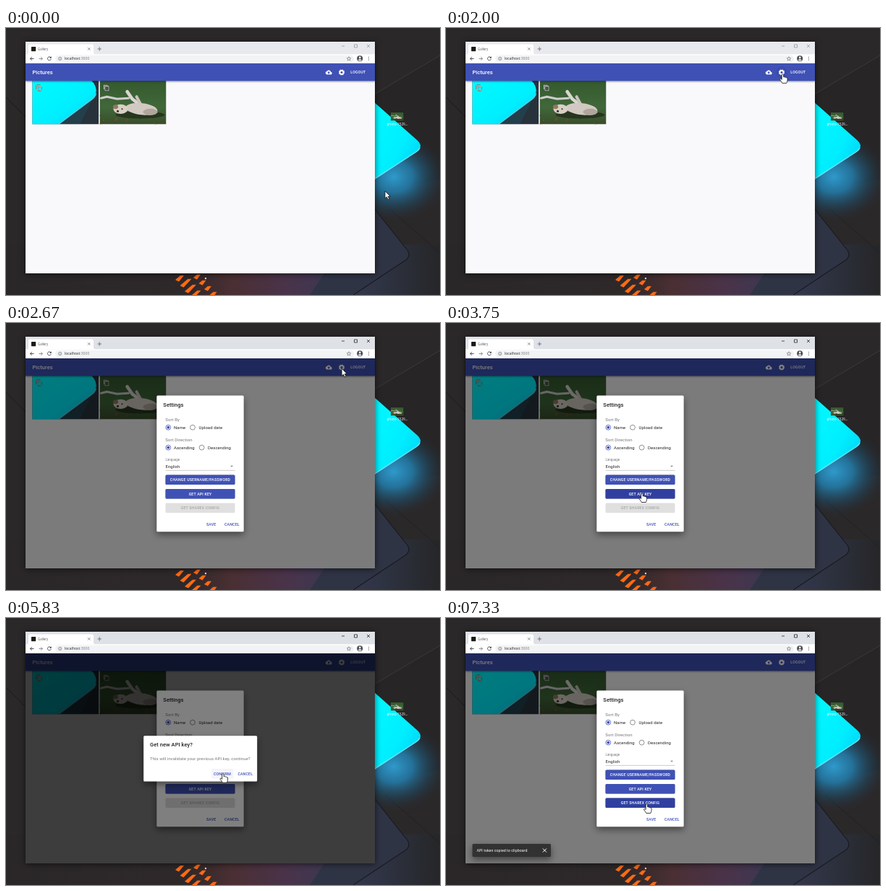
These frames come from a looping animation (600x370 px, 8000 ms). An HTML page:

```html
<!DOCTYPE html>
<html lang="en">
<head>
<meta charset="utf-8">
<title>Gallery settings</title>
<style>
html, body { margin: 0; width: 100%; height: 100%; overflow: hidden; background: #2b2829; }
svg { display: block; }
text { font-family: Roboto, sans-serif; white-space: pre; }
.os { font-family: "Open Sans", sans-serif; }
.card { filter: drop-shadow(0 4px 5px rgba(0,0,0,.45)); }
.raised { filter: drop-shadow(0 .8px .7px rgba(0,0,0,.4)); }
.icon { filter: drop-shadow(0 0 1px #000) drop-shadow(0 0 1px rgba(0,0,0,.6)); }
</style>
</head>
<body>
<svg id="stage" width="600" height="370" viewBox="0 0 600 370"></svg>
<script>
const LOOP = 8000, FPS = 12;
const INDIGO = '#3f51b5', DARK = '#303f9f', INK = 'rgba(0,0,0,.87)', SOFT = 'rgba(0,0,0,.54)';
const stage = document.getElementById('stage');
const $ = id => document.getElementById(id);

// Markup helpers
const text = (x, y, size, str, fill = INK, more = '') =>
  `<text x="${x}" y="${y}" font-size="${size}" fill="${fill}" ${more}>${str}</text>`;
const rect = (x, y, w, h, fill, more = '') =>
  `<rect x="${x}" y="${y}" width="${w}" height="${h}" fill="${fill}" ${more}/>`;
const circle = (x, y, r, fill, more = '') =>
  `<circle cx="${x}" cy="${y}" r="${r}" fill="${fill}" ${more}/>`;
const path = (d, fill, more = '') => `<path d="${d}" fill="${fill}" ${more}/>`;
const line = (d, color, width = 1, more = '') =>
  path(d, 'none', `stroke="${color}" stroke-width="${width}" ${more}`);
const at = (x, y, scale, body, more = '') =>
  `<g transform="translate(${x} ${y}) scale(${scale})" ${more}>${body}</g>`;
const caps = (x, y, str, fill, more = '') =>
  text(x, y, 5.25, str, fill, `font-weight="500" letter-spacing=".15" ${more}`);
const title = (x, y, str, fill) => text(x, y, 7.5, str, fill, 'font-weight="500" letter-spacing=".056"');
const body = (x, y, str, fill) => text(x, y, 6, str, fill, 'letter-spacing=".056"');

const radio = (x, y, on) => on
  ? circle(x, y, 3.4, 'none', `stroke="${INDIGO}" stroke-width=".8"`) + circle(x, y, 1.9, INDIGO)
  : circle(x, y, 3.4, 'none', `stroke="${SOFT}" stroke-width=".8"`);

const button = (i, str) => {
  const y = 210.5 + i * 19.5;
  return rect(220.5, y, 96, 13.5, INDIGO, `id="btn${i}" rx="1.5" class="raised"`) +
    caps(268.5, y + 8.6, str, '#fff', `id="label${i}" text-anchor="middle"`);
};

const COPY = 'M16 1H4c-1.1 0-2 .9-2 2v14h2V3h12V1zm3 4H8c-1.1 0-2 .9-2 2v14c0 1.1.9 2 2 2h11c1.1 0 2-.9 2-2V7c0-1.1-.9-2-2-2zm0 16H8V7h11v14z';
const CLOUD = 'M19.35 10.04C18.67 6.59 15.64 4 12 4 9.11 4 6.6 5.64 5.35 8.04 2.34 8.36 0 10.91 0 14c0 3.31 2.69 6 6 6h13c2.76 0 5-2.24 5-5 0-2.64-2.05-4.78-4.65-4.96zM14 13v4h-4v-4H7l5-5 5 5h-3z';

function defs() {
  const stops = list => list.map(([o, c, a = 1]) =>
    `<stop offset="${o}" stop-color="${c}" stop-opacity="${a}"/>`).join('');
  let leaves = '';
  for (let i = 0; i < 26; i++)
    leaves += circle((i * 37) % 92, 48 + (i * 7) % 12, .7 + (i % 3) * .3, i % 2 ? '#7d4a36' : '#2c4a20');
  return `<defs>
    <linearGradient id="floor">${stops([[0, '#2a2728'], [.42, '#2e2829'], [.52, '#4a2f33'], [.64, '#4a3349'], [.76, '#3a3853'], [.87, '#2e3342'], [1, '#262628']])}</linearGradient>
    <radialGradient id="glow">${stops([[0, '#2fa0d4', .95], [.35, '#247fae', .85], [.7, '#1e4f6c', .45], [1, '#22303c', 0]])}</radialGradient>
    <linearGradient id="cyan" x2="1" y2="1">${stops([[0, '#00fbff'], [.6, '#00eeff'], [1, '#00c8f2']])}</linearGradient>
    <linearGradient id="grass" x2="0" y2="1">${stops([[0, '#34592d'], [.6, '#40683a'], [1, '#3a4d2b']])}</linearGradient>
    <clipPath id="key">${rect(220.5, 230, 96, 13.5, '#000', 'rx="1.5"')}</clipPath>
    <symbol id="dog" viewBox="0 0 92 60">
      ${rect(0, 0, 92, 60, 'url(#grass)')}${leaves}
      <ellipse cx="56" cy="47" rx="34" ry="5" fill="#26361f"/>
      <g stroke-linecap="round" stroke-linejoin="round">
        ${line('M2 24L10 22L24 25L40 24', '#cfcdcd', 3)}
        ${line('M38 15L45 25L54 32', '#d9d5d2', 4.5)}
        ${line('M51 22L57 33', '#c9c3bd', 4)}
      </g>
      <ellipse cx="58" cy="39" rx="22" ry="8" fill="#d2cac2" transform="rotate(6 58 39)"/>
      <ellipse cx="70" cy="43" rx="10" ry="4.500" fill="#b0a69d"/>
      <ellipse cx="29" cy="39" rx="10" ry="6.500" fill="#d8cfc5"/>
      <ellipse cx="22" cy="36" rx="3.500" ry="3" fill="#94785f"/>
      ${circle(25, 42, 1.5, '#30251f')}${circle(31, 39, 1, '#30251f')}
    </symbol>
  </defs>`;
}

function desktop() {
  const bar = (x, y, len) =>
    path(`M${x} ${y}l${len} ${-len * .85}h5l${-len} ${len * .85 + 2.5}z`, '#ff6a13');
  let bars = '';
  for (let i = 0; i < 4; i++)
    bars += bar(234 + i * 6.5, 349 + i * 8, 7 + Math.min(i, 1) * 4) + bar(259 + i * 7.5, 346 + i * 8, 5);
  return rect(0, 0, 600, 370, '#2b2829') +
    path('M509 92L600 38V210L509 230z', '#272526') +
    line('M600 38L509 92', '#3b393a') + line('M0 96L28 124M0 353L28 331', '#1c1a1b') +
    rect(0, 300, 600, 70, 'url(#floor)') +
    path('M509 250L555 308Q560 316 552 322L480 370H420L500 250z', '#2f3444') +
    line('M509 250L555 308Q560 316 552 322L480 370', '#191b22', 1.2) +
    line('M524 245L600 312', '#1f2126') +
    `<ellipse cx="536" cy="206" rx="74" ry="62" fill="url(#glow)"/>` +
    path('M500 95L569 156Q577 164 569 170L500 216z', 'url(#cyan)') +
    line('M572 166Q571 169 568 171L505 212', '#6fe3f3', 1.5) +
    bars + circle(276, 347, 1.2, '#e8dcd6') +
    '<use href="#dog" x="532" y="117" width="17.5" height="11.5"/>' +
    text(541, 135.3, 4.7, 'photo-1529...', '#fff', 'class="os" text-anchor="middle"');
}

function browser() {
  const g = '#5f6368';
  return rect(27, 19, 483, 321, '#f9f8fa', 'style="filter:drop-shadow(0 1px 4px rgba(0,0,0,.6))"') +
    rect(27, 19, 483, 17.5, '#e7e9ed', 'id="strip"') +
    path('M28 36.5Q31 36.5 31 33.5V25Q31 22.5 33.5 22.5H118.5Q121 22.5 121 25V33.5Q121 36.5 124 36.5z', '#fff') +
    rect(35, 26, 6.2, 6.2, '#1d1b12', 'rx=".6"') +
    text(44, 31, 4.4, 'Gallery', '#55585c', 'class="os"') +
    line('M113 27.2l3.5 3.5m0 -3.5l-3.5 3.5', g, .7) +
    line('M126.5 29h5.5M129.25 26.25v5.5', g, .8) +
    line('M464 25h4M481.500 23h4v4h-4zM499 23l4 4m0 -4l-4 4', '#8d9093', .7, 'id="controls"') +
    rect(27, 36.5, 483, 12.5, '#fff') +
    rect(68, 37.7, 413, 9.6, '#f1f3f4', 'rx="4.8"') +
    line('M38.5 42.5h-5m2.3 -2.3l-2.3 2.3l2.3 2.3', '#3f4246', .9) +
    line('M45.5 42.5h5m-2.3 -2.3l2.3 2.3l-2.3 2.3', '#85888c', .9) +
    line('M62 40.9a2.5 2.5 0 1 0 .3 2.3', '#3f4246', .9) + path('M62.7 39.3v2.6h-2.6z', '#3f4246') +
    circle(74.7, 42.5, 2.2, 'none', `stroke="${g}" stroke-width=".6"`) + line('M74.7 42.2v1.5M74.7 41v.6', g, .6) +
    text(81, 44.2, 5.1, 'localhost<tspan fill="#777b80">:3000</tspan>', '#202124', 'class="os"') +
    line('M474 39.7l.8 1.8l2 .2l-1.5 1.3l.5 2l-1.8 -1.1l-1.8 1.1l.5 -2l-1.5 -1.3l2 -.2z', g, .6) +
    circle(489.2, 42.3, 4, '#4a4d51') + circle(489.2, 41, 1.4, '#fff') + path('M486.6 44.5q2.6 -2.6 5.2 0q-2.6 2 -5.2 0z', '#fff') +
    [40.3, 42.3, 44.3].map(y => circle(501.5, y, .6, g)).join('');
}

function page() {
  const gear = circle(0, 0, 2.5, 'none', 'stroke="#fff" stroke-width="1.8"') +
    circle(0, 0, 3.5, 'none', 'stroke="#fff" stroke-width="1.1" stroke-dasharray="1.6 1.149"');
  const thumb = (x, inner) =>
    `<svg x="${x}" y="73" width="92" height="60.5" viewBox="0 0 92 60" preserveAspectRatio="none">${inner}</svg>` +
    at(x + 4.7, 78.4, .39, path(COPY, '#fff'), 'class="icon"');
  const wall = rect(0, 0, 92, 60, '#27323b') +
    path('M92 8L66 60H34L88 24z', '#1d5c74', 'opacity=".3"') +
    path('M0 0H82Q90 8 88 17Q87 22 82 26L36 60H0z', 'url(#cyan)') +
    line('M88 18Q87 22 82 26L36 60', '#54cde3', 1.6);
  return thumb(36.3, wall) + thumb(129.5, '<use href="#dog" width="92" height="60"/>') +
    rect(27, 49, 483, 24.3, INDIGO, 'style="filter:drop-shadow(0 1px 1.2px rgba(0,0,0,.4))"') +
    title(36.5, 64.1, 'Pictures', '#fff') +
    at(441.7, 57, .375, path(CLOUD, '#fff')) +
    circle(464, 61.5, 8.5, '#000', 'id="halo" opacity="0"') + at(464, 61.5, 1, gear) +
    caps(476.3, 63.3, 'LOGOUT', '#fff');
}

const shade = id => rect(27, 49, 483, 291, '#000', `id="${id}" opacity="0"`);

const settings = () => '<g id="settings">' +
  rect(208.3, 100.5, 120.4, 188.7, '#fff', 'rx="1.5" class="card"') +
  title(217.3, 115.5, 'Settings') +
  body(220.3, 135.6, 'Sort By', SOFT) +
  radio(224.3, 144.7, true) + body(232, 146.9, 'Name') +
  radio(258, 144.7) + body(266.5, 146.9, 'Upload date') +
  body(220.3, 163.5, 'Sort Direction', SOFT) +
  radio(224.3, 172.6, true) + body(232, 174.8, 'Ascending') +
  radio(270.6, 172.6) + body(279, 174.8, 'Descending') +
  text(220.5, 190.5, 4.5, 'Language', SOFT) + body(220.5, 200.7, 'English') +
  line('M220.5 204.3h96', 'rgba(0,0,0,.42)', .5) + path('M310.2 197.7h3.8l-1.9 1.9z', SOFT) +
  button(0, 'CHANGE USERNAME/PASSWORD') + button(1, 'GET API KEY') + button(2, 'GET SHAREX CONFIG') +
  circle(271, 237, 0, '#fff', 'id="ripple" clip-path="url(#key)"') +
  caps(277, 280.9, 'SAVE', INDIGO) + caps(302, 280.9, 'CANCEL', INDIGO) + '</g>';

const confirmBox = () => '<g id="confirm">' +
  rect(190.2, 163.3, 157, 63.3, '#fff', 'rx="1.5" class="card"') +
  title(199, 178, 'Get new API key?') +
  body(199, 196.8, 'This will invalidate your previous API key, continue?', SOFT) +
  rect(284, 209, 30.5, 13.5, INDIGO, 'id="over" rx="1.5" opacity="0"') +
  caps(287, 217.9, 'CONFIRM', INDIGO) + caps(320.4, 217.9, 'CANCEL', INDIGO) + '</g>';

const snack = () => '<g id="snack">' +
  rect(36.5, 313, 108.5, 18, '#323232', 'rx="1.5" class="card"') +
  text(42.5, 323.9, 5.25, 'API token copied to clipboard', '#fff', 'letter-spacing=".05"') +
  line('M133.9 319.5l5 5m0 -5l-5 5', '#fff', 1) + '</g>';

const pointers = () => '<g id="cursor">' +
  path('M0 0V10.2L2.4 8L4 11.7L5.8 10.9L4.2 7.3H7.3z', '#fff', 'id="arrow" stroke="#111" stroke-width=".8"') +
  path('M-1.3 .8Q0 -.8 1.2 .8V4Q2.7 3.2 3.3 4.4Q4.6 3.8 5.1 5Q6.6 4.7 6.6 6.2V8.5Q6.4 10.5 5.3 12.5H-.6Q-1.6 10.5 -3.7 8Q-4.3 6.4 -2.9 6.2L-1.3 7.5z', '#fff', 'id="hand" stroke="#111" stroke-width=".8"') + '</g>';

stage.innerHTML = defs() + desktop() + browser() + page() + shade('shade1') + settings() +
  shade('shade2') + confirmBox() + snack() + pointers();

// Motion
const clamp = v => Math.max(0, Math.min(1, v));
const ease = v => v * v * (3 - 2 * v);
const ramp = (t, start, dur) => ease(clamp((t - start) / dur));
const set = (id, attrs) => { for (const k in attrs) $(id).setAttribute(k, attrs[k]); };
const fade = (id, v) => set(id, { opacity: v, visibility: v ? 'visible' : 'hidden' });

// Pointer moves: start, end, x, y
const START = [524, 226];
const MOVES = [
  [750, 1080, 428.5, 185],
  [1170, 2080, 466.3, 61.2],
  [2600, 3670, 271, 236],
  [4920, 5170, 300, 215.7],
  [7080, 7330, 277.5, 258]
];

function pointerAt(t) {
  let [x, y] = START;
  for (const [a, b, tx, ty] of MOVES) {
    const k = ramp(t, a, b - a);
    x += (tx - x) * k;
    y += (ty - y) * k;
  }
  return [x, y];
}

function render(ms) {
  const t = Math.floor((ms + 5) * FPS / 1000) * 1000 / FPS;
  const [x, y] = pointerAt(t);
  const open = ramp(t, 2214, 225);
  const ask = ramp(t, 4266, 225) - ramp(t, 5860, 195);
  const note = ramp(t, 6290, 225);
  const active = t > 2150, ready = t > 6300;

  set('strip', { fill: active ? '#dee1e6' : '#e7e9ed' });
  set('controls', { stroke: active ? '#111' : '#8d9093' });
  fade('shade1', open * .5);
  fade('settings', open);
  fade('shade2', ask * .5);
  fade('confirm', ask);
  fade('snack', note);
  set('snack', { transform: `translate(90.75 322) scale(${.75 + .25 * note}) translate(-90.75 -322)` });

  const onGear = open < 1 && Math.hypot(x - 464, y - 61.5) < 9;
  const onConfirm = ask > 0 && x > 284 && x < 314.5 && y > 209 && y < 222.5;
  let onButton = false;
  for (let i = 0; i < 3; i++) {
    const top = 210.5 + i * 19.5, off = i === 2 && !ready;
    const over = open === 1 && ask === 0 && !off && x > 220 && x < 317 && y > top && y < top + 13.5;
    onButton = onButton || over;
    set('btn' + i, { fill: off ? '#e0e0e0' : over ? DARK : INDIGO, class: off ? '' : 'raised' });
    set('label' + i, { fill: off ? '#a6a6a6' : '#fff' });
  }
  set('halo', { opacity: onGear ? .04 : 0 });
  set('over', { opacity: onConfirm ? .06 : 0 });
  set('ripple', { r: 50 * clamp((t - 4200) / 320), opacity: .22 * (1 - clamp((t - 4500) / 250)) });

  const hand = onGear || onConfirm || onButton;
  set('cursor', { transform: `translate(${x} ${y})` });
  set('arrow', { visibility: hand ? 'hidden' : 'visible' });
  set('hand', { visibility: hand ? 'visible' : 'hidden' });
}

const began = performance.now();
function tick() {
  render((performance.now() - began) % LOOP);
  requestAnimationFrame(tick);
}
tick();
</script>
</body>
</html>
```
